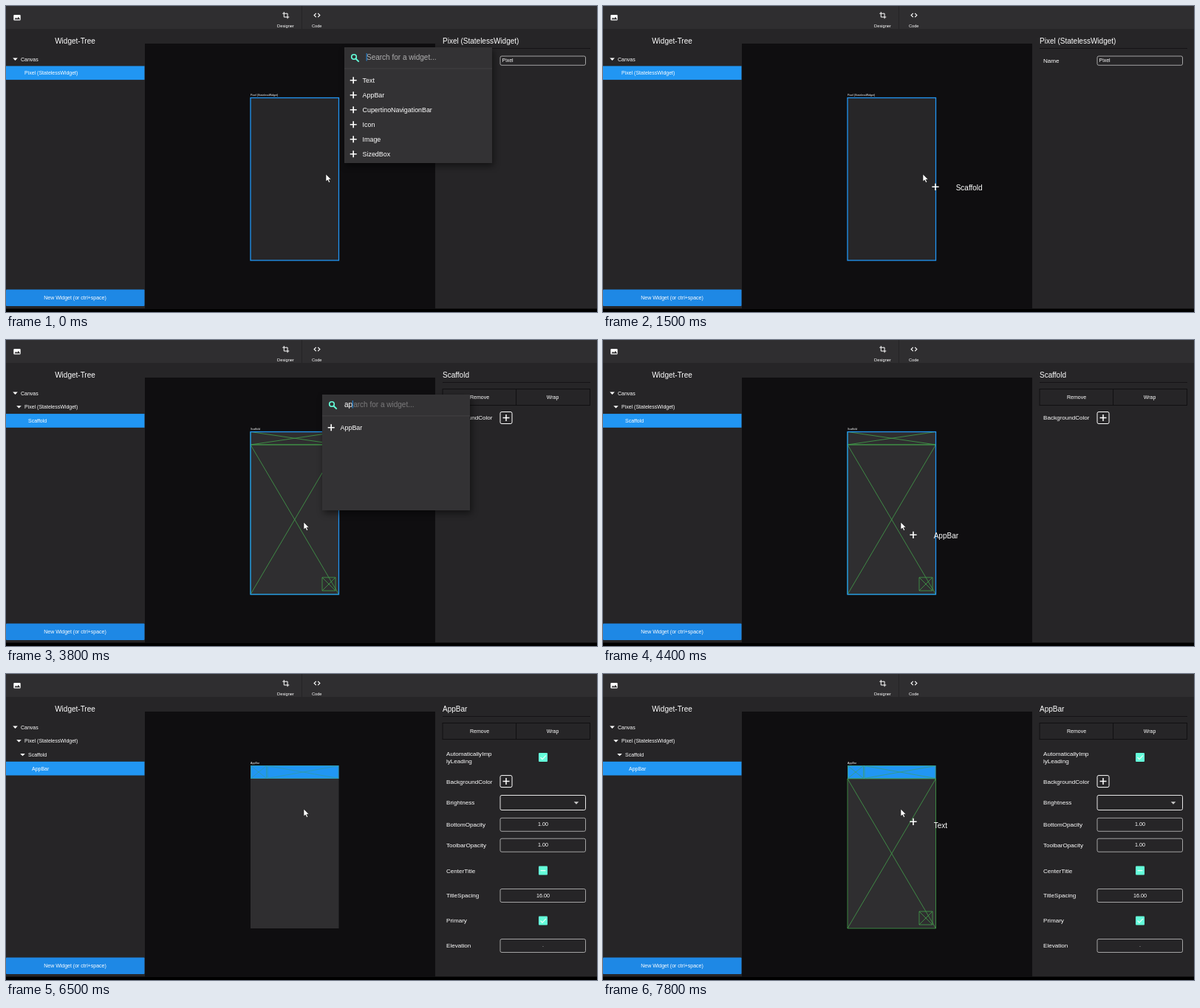
Write an HTML page that moves like this. It is 800 px wide and 415 px high and loops after 8 s.

```html
<!DOCTYPE html>
<html lang="en">
<head>
<meta charset="utf-8">
<title>Widget designer</title>
<style>
  html, body { margin: 0; width: 100%; height: 100%; overflow: hidden; background: #000; }
  svg { display: block; width: 800px; height: 415px; font-family: "Liberation Sans", Arial, sans-serif; }
</style>
</head>
<body>
<svg id="stage" viewBox="0 0 800 415"></svg>
<script>
const LOOP = 8000, STEP = 100;
const BLUE = '#2196f3', GREEN = '#43a04b', TEAL = '#64ffda', WHITE = '#fff';
const PANEL = '#262527', BAR = '#2f2e30', CANVAS = '#0f0e10', LINE = '#111012';
const HINT = 'Search for a widget...';
const WIDGETS = ['Text', 'AppBar', 'CupertinoNavigationBar', 'Icon', 'Image', 'SizedBox', 'Scaffold', 'Stack'];

// time, x, y of the pointer tip
const POINTER = [
  [0, 433, 228], [1700, 433, 228], [2600, 400, 214], [2700, 400, 214], [3100, 403, 247],
  [4400, 403, 247], [5200, 406, 135], [5400, 406, 135], [6200, 404, 182], [6300, 403, 183]
];
const SEARCHES = [
  { open: 0, close: 1500, x: 458, y: 56, keys: [[800, 's'], [900, 'sc'], [1000, 'sca'], [1100, 'scaf']] },
  { open: 3200, close: 4400, x: 428, y: 74, keys: [[3800, 'ap'], [4000, 'app']] },
  { open: 6600, close: 7500, x: 428, y: 54, keys: [[7000, 't'], [7100, 'te'], [7200, 'tex'], [7300, 'text']] }
];
const DRAGS = [
  { from: 1500, to: 2700, name: 'Scaffold' },
  { from: 4400, to: 5400, name: 'AppBar' },
  { from: 7500, to: LOOP, name: 'Text' }
];

const pen = document.createElement('canvas').getContext('2d');
pen.font = '10px "Liberation Sans", Arial, sans-serif';
const widthOf = s => pen.measureText(s).width;

const rect = (x, y, w, h, fill, extra = '') =>
  `<rect x="${x}" y="${y}" width="${w}" height="${h}" fill="${fill}" ${extra}/>`;
const box = (x, y, w, h, color, weight = 1, r = 0) =>
  rect(x, y, w, h, 'none', `rx="${r}" stroke="${color}" stroke-width="${weight}"`);
const path = (d, color, weight = 1, fill = 'none', extra = '') =>
  `<path d="${d}" fill="${fill}" stroke="${color}" stroke-width="${weight}" ${extra}/>`;
// y is the middle of the capitals
const text = (x, y, size, s, anchor = 'start', fill = WHITE) =>
  `<text x="${x}" y="${y + size * 0.36}" font-size="${size}" text-anchor="${anchor}" fill="${fill}">${s}</text>`;
const plus = (x, y, r = 4.5, weight = 1.6) =>
  path(`M${x - r} ${y}h${2 * r}M${x} ${y - r}v${2 * r}`, WHITE, weight);
const arrow = (x, y, color = WHITE) => path(`M${x - 3.3} ${y - 1.5}h6.6l-3.3 3.4z`, 'none', 0, color);
const crossed = (x, y, w, h, color, weight = 0.8) =>
  path(`M${x} ${y}h${w}v${h}h${-w}zl${w} ${h}m0 ${-h}l${-w} ${h}`, color, weight);

function pointerAt(t) {
  const i = POINTER.findIndex(p => p[0] > t);
  if (i < 0) return POINTER.at(-1).slice(1);
  const [a, b] = [POINTER[i - 1], POINTER[i]];
  const k = (t - a[0]) / (b[0] - a[0]), e = k * k * (3 - 2 * k);
  return [a[1] + (b[1] - a[1]) * e, a[2] + (b[2] - a[2]) * e];
}

function shell() {
  return rect(0, 0, 800, 410.5, PANEL)
    + rect(188, 51, 393, 359.5, CANVAS)
    + rect(0, 0, 800, 31, BAR)
    + rect(400, 0, 1, 31, '#252426')
    + rect(10.3, 12, 9.4, 7.6, WHITE, 'rx="1"')
    + path('M11.5 18.2l2-2.7 1.4 1.7 1.9-2.5 2.4 3.5z', 'none', 0, BAR)
    + path('M376.3 8v7h7M374.3 10.2h6.8v7', WHITE, 1)
    + path('M419.8 9.8l-2.7 2.7 2.7 2.7M422.2 9.8l2.7 2.7-2.7 2.7', WHITE, 1.1)
    + text(378.5, 26.8, 5.7, 'Designer', 'middle')
    + text(420.7, 26.8, 5.7, 'Code', 'middle')
    + text(93.5, 47.5, 10, 'Widget-Tree', 'middle')
    + rect(0, 384.5, 187.5, 22.5, '#1e88e5', 'rx="1"')
    + text(93.5, 395.7, 7, 'New Widget (or ctrl+space)', 'middle');
}

function tree(names) {
  const last = names.length - 1;
  return names.map((name, i) => {
    const y = 72 + 18.7 * i;
    return (i === last ? rect(0, y - 9.3, 187.5, 18.7, BLUE) : arrow(12.5 + 5 * i, y))
      + text(20 + 5 * i, y, 7, name);
  }).join('');
}

function phone(selected, dragging, overBar) {
  const [x, y, w, h] = [331, 124.5, 119.5, 220.5];
  const guides = selected === 'Scaffold' || (selected === 'AppBar' && dragging);
  let s = text(x, 121, 3.6, selected) + rect(x, y, w, h, selected[0] === 'P' ? '#272628' : '#2f2e30');
  if (guides) s += crossed(x, 142, w, 203, GREEN) + crossed(428, 322, 18, 18, GREEN);
  if (selected === 'AppBar') {
    s += rect(x, y - 0.5, w, 18, BLUE)
      + `<g opacity="${dragging ? 0.8 : 0.5}">${crossed(331.5, 124.5, 21, 17, GREEN, 0.7)}${crossed(354, 124.5, 96, 17, GREEN, 0.7)}</g>`;
  } else {
    if (guides) s += crossed(x, y, w, 17.5, overBar ? BLUE : GREEN);
    s += box(x, y, w, h, BLUE, 1.3);
  }
  return s;
}

const label = (y, s) => text(596, y, 8.1, s);
const field = (y, value, color = WHITE) =>
  box(669, y - 9, 115.5, 18, '#c4c4c5', 0.8, 2) + text(727, y - 0.5, 7.2, value, 'middle', color);
const colorButton = y =>
  label(y, 'BackgroundColor') + box(669, y - 8, 16, 16, WHITE, 1, 2) + plus(677, y, 4.5, 1.5);
const checkbox = (y, mark) =>
  rect(721, y - 6, 12, 12, TEAL, 'rx="1"') + path(`M723.5 ${y}${mark}`, '#e8fff9', 1.3);

function inspector(selected) {
  let s = text(591, 47.5, 10, selected) + rect(591, 57, 200, 0.8, LINE);
  if (selected[0] === 'P')
    return s + label(74.3, 'Name') + box(669, 68, 115.5, 12.3, '#c4c4c5', 0.8, 2) + text(671.5, 73.3, 7, 'Pixel');
  s += box(591, 66.5, 199.5, 22, LINE) + rect(690, 66.5, 1, 22, LINE)
    + text(641, 77.3, 7, 'Remove', 'middle') + text(740, 77.3, 7, 'Wrap', 'middle');
  if (selected === 'Scaffold') return s + colorButton(105.5);
  const tick = 'l2.5 2.6 5-5.2';
  return s + label(108, 'AutomaticallyImp') + label(117.7, 'lyLeading') + checkbox(113, tick)
    + colorButton(145.6)
    + label(174.5, 'Brightness') + box(669, 164.5, 115.5, 20, '#e6e6e6', 1, 2) + arrow(772, 174.8, '#ccc')
    + label(204.3, 'BottomOpacity') + field(204.3, '1.00')
    + label(232.2, 'ToolbarOpacity') + field(232.2, '1.00')
    + label(266.6, 'CenterTitle') + checkbox(266.6, 'h7')
    + label(300.5, 'TitleSpacing') + field(300.5, '16.00')
    + label(334.5, 'Primary') + checkbox(334.5, tick)
    + label(368.5, 'Elevation') + field(368.5, '-', '#8a8a8b');
}

function search({ x, y, open, keys }, t) {
  const typed = keys.filter(k => k[0] <= t).at(-1)?.[1] ?? '';
  const w = widthOf(typed), sinceKey = t - keys[0][0];
  const hintAlpha = sinceKey < 0 ? 0.6 : sinceKey < 200 ? 0.35 : 0;
  const hits = WIDGETS.filter(n => n.toLowerCase().includes(typed)).slice(0, 6);
  const caretOn = typed || (t - open) % 1000 < 500;
  return rect(x + 2, y + 4, 200, 157, '#000', 'opacity=".5" filter="url(#soft)"')
    + rect(x, y, 200, 157, '#333234')
    + rect(x, y + 28.5, 200, 0.8, '#454446')
    + `<circle cx="${x + 13}" cy="${y + 13}" r="3.3" fill="none" stroke="${TEAL}" stroke-width="1.6"/>`
    + path(`M${x + 15.5} ${y + 15.5}l4.2 4.2`, TEAL, 1.8)
    + `<g opacity="${hintAlpha}">${text(x + 30, y + 13.5, 10, HINT)}</g>`
    + (typed && rect(x + 29, y + 7, w + 2, 15, '#333234') + text(x + 30, y + 13.5, 10, typed))
    + (caretOn ? rect(x + 29.7 + w, y + 8, 0.9, 10.5, BLUE) : '')
    + hits.map((n, i) => plus(x + 12.2, y + 44.7 + 20 * i) + text(x + 24.6, y + 44.7 + 20 * i, 8.9, n)).join('');
}

function scene(t) {
  const [px, py] = pointerAt(t);
  const drag = DRAGS.find(d => t >= d.from && t < d.to);
  const popup = SEARCHES.find(p => t >= p.open && t < p.close);
  const names = ['Canvas', 'Pixel (StatelessWidget)'];
  for (const d of DRAGS) if (t >= d.to) names.push(d.name);
  const selected = names.at(-1);
  const textDrop = drag?.name === 'Text' ? 4 : 0;
  return '<defs><filter id="soft" x="-20%" y="-20%" width="140%" height="140%"><feGaussianBlur stdDeviation="5"/></filter></defs>'
    + shell() + tree(names) + inspector(selected) + phone(selected, drag, drag && py < 142)
    + (popup ? search(popup, t) : '')
    + (drag ? plus(px + 17, py + 17.3, 4.6) + text(px + 44.7, py + 18 + textDrop, 10, drag.name) : '')
    + path('M0 0V10L2.3 8 4 11.6 5.7 10.8 4.1 7.3H7.2Z', '#111', 0.6, WHITE, `transform="translate(${px} ${py})"`);
}

const stage = document.getElementById('stage');
let shown = -1;
function tick() {
  const t = Math.floor(performance.now() % LOOP / STEP) * STEP;
  if (t !== shown) stage.innerHTML = scene(shown = t);
  requestAnimationFrame(tick);
}
tick();
</script>
</body>
</html>
```
